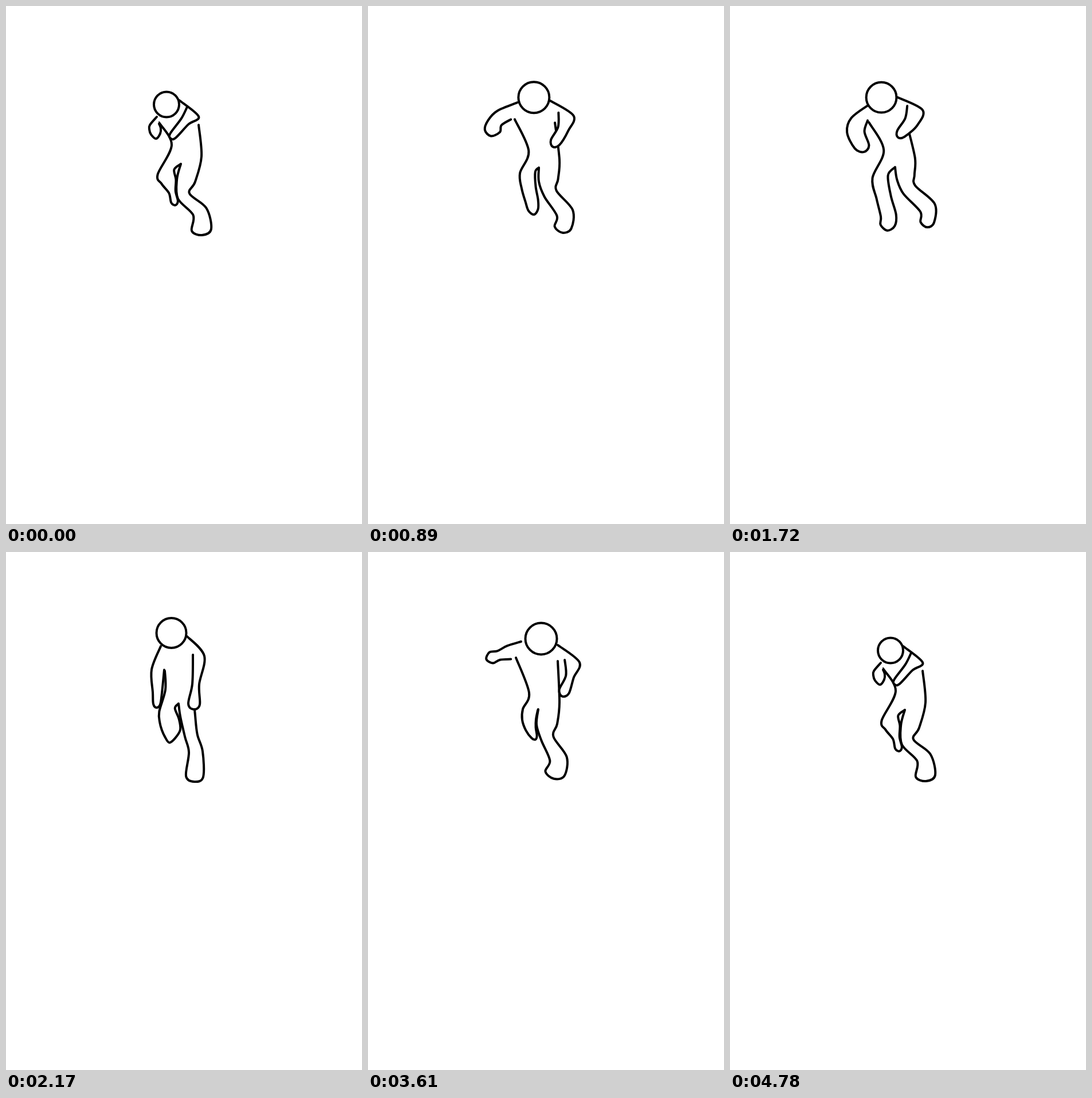
Recreate the animation shown at these times as an HTML page with a canvas. Size 621 by 902 pixels, loop 4840 ms.

```html
<!DOCTYPE html>
<html lang="en">
<head>
<meta charset="utf-8">
<title>Runner</title>
<style>
html, body { margin: 0; width: 100%; height: 100%; overflow: hidden; background: #fff; }
canvas { display: block; }
</style>
</head>
<body>
<canvas id="stage" width="621" height="902"></canvas>
<script>
const LOOP = 4840, STEP = 1000 / 18, LAST = 86;
const ctx = document.getElementById('stage').getContext('2d');

// Arms: neck point, then three joints. Legs: armpit and waist points, then four joints.
// A joint is x, y and half the limb's width.
const pose = (head, armL, armR, legL, legR, crotch) =>
  ({ head, armL, armR, legL, legR, crotch, shift: [0, 0], reach: [1] });

const crouch = pose([280, 171.5, 22],
  [263, 193, 259, 206, 8, 260, 214, 10, 261, 223, 8],
  [302, 164, 326, 184, 13, 312, 201, 8, 291, 226, 6],
  [267, 203, 289, 242, 279, 289, 15, 284, 306, 13, 290, 324, 6, 294, 341, 6],
  [336, 207, 341, 262, 314, 304, 16, 310, 331, 11, 338, 358, 13, 341, 390, 17],
  [305, 275]);
const swing = pose([270, 181, 24.5],
  [261, 222, 264, 232, 9, 242, 238, 7, 229, 246, 9],
  [296, 175, 322, 190, 12, 331, 208, 13, 314, 225, 8],
  [260, 207, 285, 267, 288, 308, 13, 287, 336, 11, 268, 364, 9, 262, 382, 8],
  [326, 230, 337, 270, 315, 305, 14, 313, 335, 11, 352, 353, 11, 383, 386, 20],
  [306, 288]);
const raised = pose([282, 166, 24.5],
  [210, 181, 222, 182, 8, 234, 165, 17, 243, 150, 13],
  [347, 194, 346, 176, 15, 325, 175, 20, 303, 180, 12],
  [236, 186, 268, 232, 284, 290, 7, 289, 317, 9, 340, 352, 14, 356, 375, 17],
  [321, 211, 323, 262, 304, 300, 15, 290, 335, 10, 280, 375, 9, 277, 408, 8],
  [296, 270]);
const upright = pose([288.5, 141, 26],
  [270, 164, 265, 205, 11, 264, 245, 8, 263, 265, 6],
  [316, 147, 336, 180, 10, 331, 230, 6, 328, 265, 10],
  [277, 207, 278, 240, 281, 275, 14, 285, 294, 17, 288, 310, 16, 286, 323, 9],
  [327, 184, 326, 235, 317, 285, 13, 323, 320, 11, 331, 348, 12, 329, 391, 15],
  [301, 264]);
const lean = pose([276, 169, 26],
  [258, 185, 250, 212, 10, 250, 240, 12, 265, 274, 9],
  [304, 165, 336, 180, 14, 329, 203, 14, 308, 222, 8],
  [262, 216, 289, 260, 280, 312, 14, 289, 355, 13, 299, 392, 15, 295, 410, 15],
  [327, 222, 344, 272, 330, 305, 15, 338, 325, 13, 374, 355, 14, 376, 380, 10],
  [310, 290]);
const point = pose([302, 151, 27.5],
  [267, 156, 246, 175, 12, 228, 180, 8, 215, 184, 10],
  [331, 162, 356, 190, 13, 352, 217, 7, 342, 243, 9],
  [258, 184, 281, 245, 283, 275, 13, 281, 292, 12, 284, 308, 9, 290, 322, 5],
  [331, 190, 334, 262, 312, 300, 18, 313, 325, 11, 332, 360, 15, 326, 386, 17],
  [297, 274]);

const vary = (base, dx, dy, reach = 1) => ({ ...base, shift: [dx, dy], reach: [reach] });

const keys = [
  [0, crouch], [9, swing], [14, vary(point, 0, 3, 1.6)], [19, vary(lean, -10, 0)], [23, raised],
  [29, vary(lean, -20, 0)], [35, vary(point, -15, -20, 2.5)], [39, upright],
  [51, lean], [56, crouch], [60, lean], [65, point],
  [70, vary(lean, -20, 0)], [75, vary(point, -10, 0)], [80, vary(lean, -15, 4)], [LAST, crouch]
];

function blend(from, to, u) {
  return Object.fromEntries(Object.keys(from).map(part =>
    [part, from[part].map((v, i) => v + (to[part][i] - v) * u)]));
}

// Outline of a limb: down one side, round the tip and back up the other.
function tube(values) {
  const joints = [];
  for (let i = 0; i < values.length; i += 3) joints.push(values.slice(i, i + 3));
  const left = [], right = [];
  let tip;
  joints.forEach(([x, y, w], i) => {
    const a = joints[Math.max(0, i - 1)], b = joints[Math.min(joints.length - 1, i + 1)];
    const length = Math.hypot(b[0] - a[0], b[1] - a[1]) || 1;
    const tx = (b[0] - a[0]) / length, ty = (b[1] - a[1]) / length;
    const cap = Math.min(w, 9);
    left.push([x - ty * w, y + tx * w]);
    right.unshift([x + ty * w, y - tx * w]);
    tip = [x + tx * cap, y + ty * cap];
  });
  return [...left, tip, ...right];
}

function paint() {
  ctx.fill();
  ctx.stroke();
}

// Smooth open curve through the points, covering whatever lies behind it.
function outline(points) {
  const at = i => points[Math.max(0, Math.min(points.length - 1, i))];
  ctx.beginPath();
  ctx.moveTo(...points[0]);
  for (let i = 0; i < points.length - 1; i++) {
    const [a, b, c, d] = [at(i - 1), at(i), at(i + 1), at(i + 2)];
    ctx.bezierCurveTo(b[0] + (c[0] - a[0]) / 6, b[1] + (c[1] - a[1]) / 6,
      c[0] - (d[0] - b[0]) / 6, c[1] - (d[1] - b[1]) / 6, ...c);
  }
  paint();
}

function drawFigure({ head, armL, armR, legL, legR, crotch, shift, reach }) {
  const legs = [
    { foot: legL[14], path: [legL.slice(0, 2), legL.slice(2, 4), ...tube(legL.slice(4)), crotch] },
    { foot: legR[14], path: [crotch, ...tube(legR.slice(4)), legR.slice(2, 4), legR.slice(0, 2)] }
  ];
  const neckL = armL.slice(0, 2), neckR = armR.slice(0, 2);
  const stretch = ([x, y]) => [neckL[0] + (x - neckL[0]) * reach[0], y];

  ctx.save();
  ctx.translate(...shift);
  legs.sort((a, b) => a.foot - b.foot).forEach(leg => outline(leg.path));
  outline([neckL, ...tube(armL.slice(2))].map(stretch));
  outline([...tube(armR.slice(2)), neckR]);
  ctx.beginPath();
  ctx.arc(...head, 0, 2 * Math.PI);
  paint();
  ctx.restore();
}

function draw(step) {
  const next = Math.max(1, keys.findIndex(([at]) => at >= step));
  const [start, from] = keys[next - 1], [end, to] = keys[next];
  const u = (step - start) / (end - start);
  ctx.fillStyle = '#fff';
  ctx.strokeStyle = '#000';
  ctx.lineWidth = 4;
  ctx.lineCap = ctx.lineJoin = 'round';
  ctx.fillRect(0, 0, 621, 902);
  drawFigure(blend(from, to, u * u * (3 - 2 * u)));
}

function tick() {
  const time = Math.floor(performance.now() % LOOP / 10) * 10;
  draw(Math.min(LAST, Math.floor((time + 5) / STEP)));
  requestAnimationFrame(tick);
}
tick();
</script>
</body>
</html>
```
